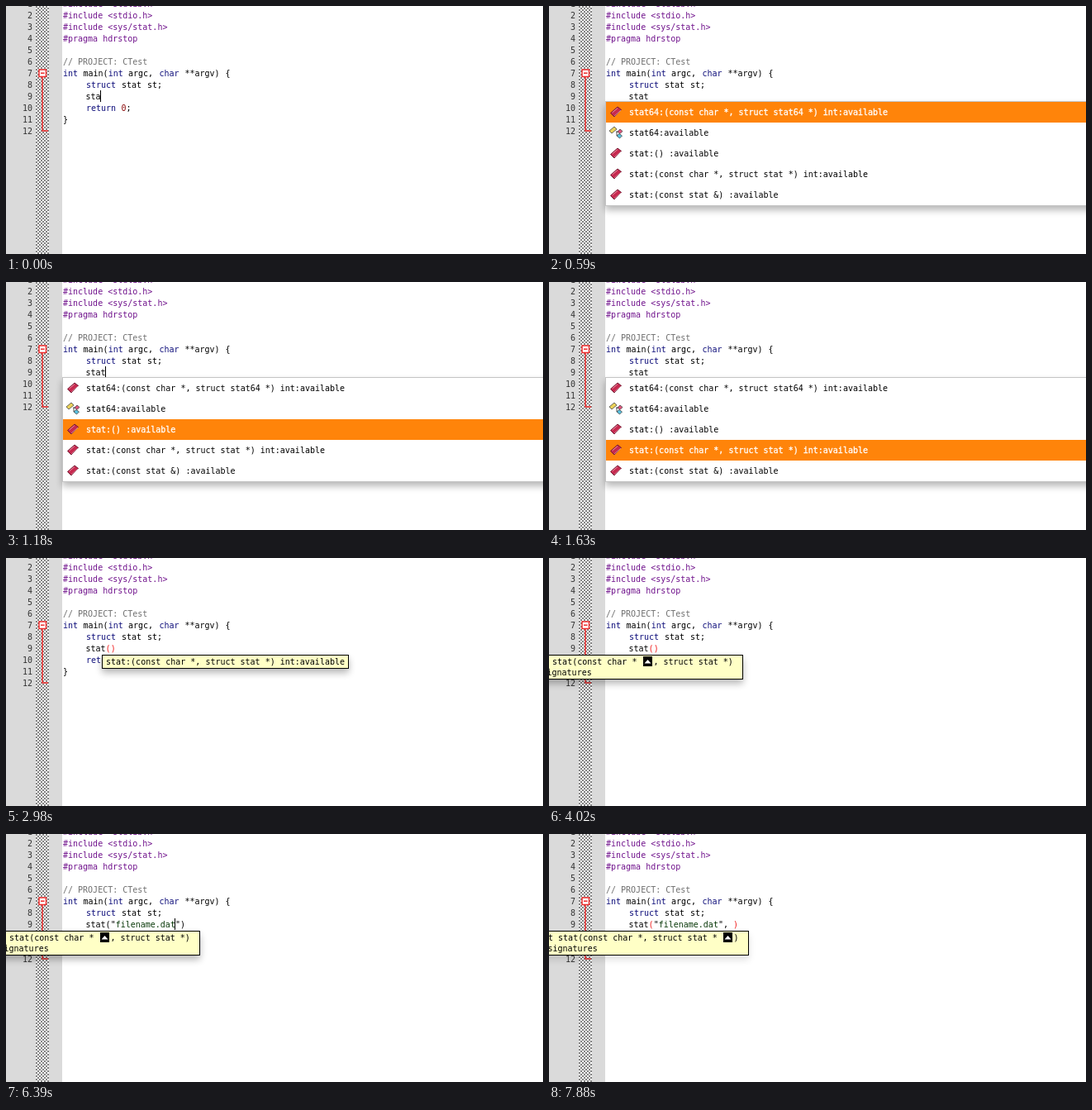
Recreate the animation shown at these times as an HTML page. Size 650x300 px, loop 8 s.

```html
<!DOCTYPE html>
<html lang="en">
<head>
<meta charset="utf-8">
<title>Code completion</title>
<style>
html, body { margin: 0; width: 100%; height: 100%; overflow: hidden; background: #fff; }
svg { display: block; width: 650px; height: 300px; }
text { font: 10px "DejaVu Sans Mono", monospace; white-space: pre; fill: #000; }
.num { fill: #333; text-anchor: end; }
.pre { fill: #70128c; }
.com { fill: #707070; }
.key { fill: #10107c; }
.lit { fill: #8c0c0c; }
.str { fill: #083808; }
.hit { fill: #f02020; }
.on { fill: #fff; stroke: #fff; stroke-width: .3px; }
</style>
</head>
<body>
<svg id="stage" viewBox="0 0 650 300">
  <defs>
    <pattern id="check" x="36" width="4" height="4" patternUnits="userSpaceOnUse">
      <rect width="4" height="4" fill="#fff"/>
      <path d="M0 0h2v2h-2zM2 2h2v2h-2z" fill="#858585"/>
    </pattern>
    <filter id="soft" filterUnits="userSpaceOnUse" x="-80" y="80" width="800" height="200">
      <feGaussianBlur stdDeviation="4.5"/>
    </filter>
  </defs>
  <rect width="68" height="300" fill="#dadada"/>
  <rect x="36" width="16" height="300" fill="url(#check)" shape-rendering="crispEdges"/>
  <g fill="none" stroke="#ee2c2c" stroke-width="1.5">
    <path d="M44 86V151H51"/>
    <rect x="40" y="77" width="8.5" height="8.5" fill="#fff"/>
    <path d="M42 81.2H46.5"/>
  </g>
  <g id="code"></g>
  <text id="typed" x="96.5" y="113"></text>
  <rect id="caret" y="102" width="1" height="14"/>
  <g id="popup"></g>
  <g id="tip"></g>
</svg>
<script>
const LOOP = 8000, PITCH = 6.02, INDENT = 96.5;
const $ = id => document.getElementById(id);
const span = (cls, s) => `<tspan class="${cls}">${esc(s)}</tspan>`;
const text = (x, y, body, cls = "") => `<text x="${x}" y="${y}" class="${cls}">${body}</text>`;
const baseline = line => 14 * line - 13;

function esc(s) {
  return s.replace(/&/g, "&amp;").replace(/</g, "&lt;").replace(/>/g, "&gt;");
}

// Each run: line, x, text, class
const runs = [
  [1, 69, "#include <stdlib.h>", "pre"],
  [2, 69, "#include <stdio.h>", "pre"],
  [3, 69, "#include <sys/stat.h>", "pre"],
  [4, 69, "#pragma hdrstop", "pre"],
  [6, 69, "// PROJECT: CTest", "com"],
  [7, 69, "int", "key"], [7, 93.5, "main("], [7, 123.7, "int", "key"],
  [7, 148, "argc,"], [7, 185.5, "char", "key"], [7, 216.5, "**argv)"], [7, 265.5, "{"],
  [8, 97, "struct", "key"], [8, 140, "stat"], [8, 171, "st;"],
  [10, 97, "return", "key"], [10, 139.5, "0", "lit"], [10, 145.5, ";"],
  [11, 69, "}"]
];

const options = [
  "stat64:(const char *, struct stat64 *) int:available",
  "stat64:available",
  "stat:() :available",
  "stat:(const char *, struct stat *) int:available",
  "stat:(const stat &) :available"
];

// Each state: start, typed text (| is the caret column), caret shown, popup row, tip
const states = [
  [0, "sta|", 1], [150, "stat|", 1],
  [590, "stat|", 0, 1], [890, "stat|", 0, 2], [1040, "stat|", 1, 2],
  [1180, "stat|", 1, 3], [1630, "stat|", 0, 4],
  [1930, "stat|", 0, 0, "hint"], [2080, "stat|", 1, 0, "hint"],
  [2530, "stat(|)", 1, 0, "hint"], [2980, "stat(|)", 0, 0, "hint"],
  [3280, "stat(|)", 0, 0, "first"], [3430, "stat(|)", 1, 0, "first"],
  [4020, "stat(|)", 0, 0, "first"], [4470, "stat(|)", 1, 0, "first"],
  ...["", "f", "fi", "fil", "file", "filena", "filename"].map((s, i) =>
    [Math.floor(4620 + i * 145.5), `stat("${s}|")`, 1, 0, "first"]),
  [5940, 'stat("filename.|")', 1, 0, "first"],
  [6240, 'stat("filename.da|")', 1, 0, "first"],
  [6390, 'stat("filename.dat|")', 1, 0, "first"],
  [6840, 'stat("filename.dat"|)', 1, 0, "first"],
  [7130, 'stat("filename.dat",|)', 1, 0, "first"],
  [7430, 'stat("filename.dat", |)', 1, 0, "first"],
  [7730, 'stat("filename.dat", |)', 1, 0, "second"],
  [7880, 'stat("filename.dat", |)', 0, 0, "second"]
];

function panel(x, y, w, h, fill, edge, shade) {
  return `<rect x="${x}" y="${y + 5}" width="${w}" height="${h}" opacity="${shade}" filter="url(#soft)"/>` +
    `<rect x="${x + .5}" y="${y + .5}" width="${w - 1}" height="${h - 1}" fill="${fill}" stroke="${edge}"/>`;
}

function book(y) {
  return `<g transform="translate(81 ${y})" stroke-linejoin="round">
    <path d="M-6.5 1.5L2 -6L6.5 -2.5L-2 6Z" fill="#c62a50" stroke="#701830"/>
    <path d="M-4.5 1L2 -4.5" stroke="#ee8ca2"/><path d="M-1.8 5L6 -1.8" stroke="#e8c4cc" stroke-width=".7"/></g>`;
}

function parts(y) {
  return `<g transform="translate(81 ${y})" stroke="#444" stroke-width=".8">
    <path d="M0 -1H5M1 -1V4H4" fill="none" stroke="#222"/>
    <path d="M-8 -2L-2 -7L1 -4L-5 1Z" fill="#ecd35a"/>
    <path d="M2 -1L5 -4L8 -1.5L5 1.5Z" fill="#e0557c"/>
    <path d="M1 4L4 1.5L7.5 4L4.5 7Z" fill="#58c4e4"/></g>`;
}

function drawPopup(row) {
  if (!row) return "";
  const list = options.map((s, i) => {
    const y = 116 + 25 * i, on = i === row - 1;
    return (on ? `<rect x="69" y="${y}" width="590" height="25" fill="#ff840a"/>` : "") +
      (i === 1 ? parts(y + 12) : book(y + 12)) + text(97, y + 16, esc(s), on ? "on" : "");
  });
  return panel(68, 115, 600, 127, "#fff", "#c4c4c4", .28) + list.join("");
}

function arrow(x) {
  return `<rect x="${x}" y="119" width="11" height="12"/>` +
    `<path d="M${x + 1.5} 127.5L${x + 5.5} 123L${x + 9.5} 127.5Z" fill="#fff"/>`;
}

function drawTip(kind) {
  const box = (x, w, h, shade) => panel(x, 117, w, h, "#ffffc6", "#000", shade);
  if (kind === "hint") return box(116, 299, 17, .28) + text(121, 129, options[3]);
  if (kind === "first") return box(-60, 295, 30, .28) + text(-20, 129, "int stat(const char *") +
    arrow(114) + text(126.5, 129, ", struct stat *)") + text(-8.5, 142, "signatures");
  if (kind === "second") return box(-60, 302, 30, .12) + text(-13, 129, "int stat(const char *, struct stat *") +
    arrow(211) + text(223.5, 129, ")") + text(-1.5, 142, "signatures");
  return "";
}

function drawTyped(s) {
  const hit = /[()]\||\|[()]/.test(s) ? "hit" : "";
  return s.replace("|", "").split(/("[^"]*"|[()])/).map(p =>
    p[0] === '"' ? '"' + span("str", p.slice(1, -1)) + '"' :
    p === "(" || p === ")" ? span(hit, p) : esc(p)).join("");
}

let shown;
function draw(ms) {
  const state = states.findLast(s => s[0] <= ms);
  if (state === shown) return;
  shown = state;
  const [, typed, caret, row, tip] = state;
  $("typed").innerHTML = drawTyped(typed);
  $("caret").setAttribute("x", Math.floor(INDENT + PITCH * typed.indexOf("|")));
  $("caret").setAttribute("visibility", caret ? "visible" : "hidden");
  $("popup").innerHTML = drawPopup(row);
  $("tip").innerHTML = drawTip(tip);
}

$("code").innerHTML =
  Array.from({ length: 12 }, (_, i) => text(32, baseline(i + 1), i + 1, "num")).join("") +
  runs.map(([line, x, s, cls]) => text(x, baseline(line), esc(s), cls)).join("");

const start = performance.now();
function tick() {
  draw((performance.now() - start) % LOOP);
  requestAnimationFrame(tick);
}
tick();
</script>
</body>
</html>
```
